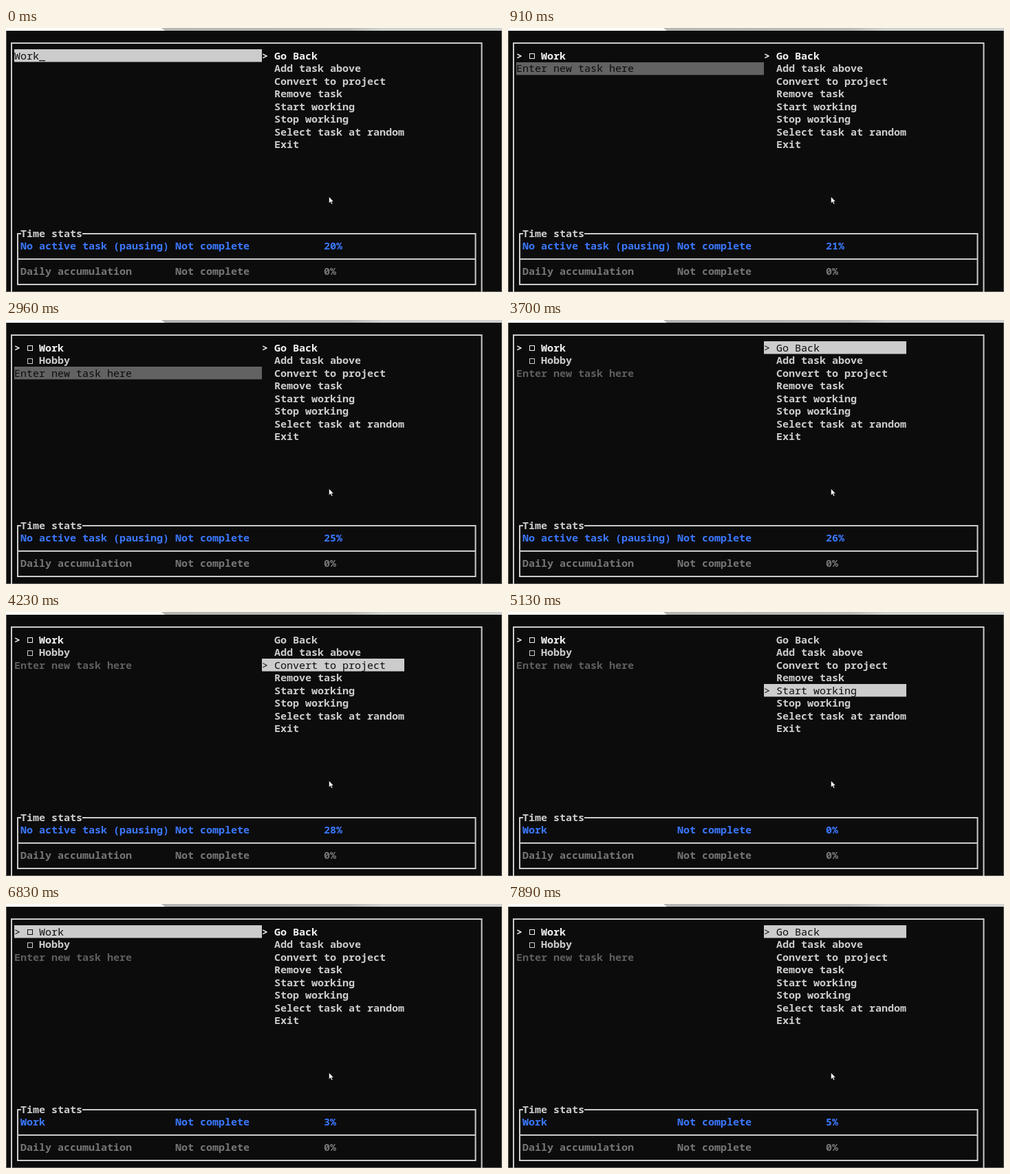
An HTML page for the animation above (8 s loop, 721 px wide and 385 px high).

```html
<!DOCTYPE html>
<html lang="en">
<head>
<meta charset="utf-8">
<title>Terminal task list</title>
<style>
  html, body { margin: 0; width: 100%; height: 100%; overflow: hidden; background: #0c0c0c; }
  svg { display: block; width: 721px; height: 385px; }
  text {
    font: 600 15px "Noto Sans Mono", "DejaVu Sans Mono", monospace;
    fill: #ccc;
    white-space: pre;
  }
  .bright { fill: #f2f2f2; font-weight: 700; }
  .dark { fill: #0c0c0c; font-weight: 400; }
  .dim { fill: #767676; }
  .hint { fill: #5e5e5e; }
  .blue { fill: #3b78ff; }
  .lines { fill: none; stroke: #ccc; stroke-width: 2; }
</style>
</head>
<body>
<svg viewBox="0 0 721 385">
  <defs>
    <linearGradient id="tabs">
      <stop offset="0" stop-color="#b4b4b4"/>
      <stop offset=".55" stop-color="#b8b8b8"/>
      <stop offset=".65" stop-color="#cfd2d0"/>
      <stop offset="1" stop-color="#cfd2d0"/>
    </linearGradient>
  </defs>
  <rect width="721" height="385" fill="#0c0c0c"/>
  <rect x="226" width="495" height="4" fill="url(#tabs)"/>
  <path d="M0 0H226L231 4H0Z" fill="#fff"/>
  <path d="M.5 4V384.5H720.5V4" fill="none" stroke="#5c5c5c"/>
  <path class="lines" d="M8 385V22H691.5V385M22 300H17V374H682.5V300H111M17 337H682.5"/>
  <g id="screen"></g>
  <path d="M469.5 246V255.6L471.7 253.6L473.3 257L474.9 256.2L473.3 253H476.2Z"
        fill="#fff" stroke="#000" stroke-width=".5"/>
</svg>
<script>
const LOOP = 8000, CELL = 9, ROW = 18.5, LEFT = 12, TOP = 31;
const MENU = ["Go Back", "Add task above", "Convert to project", "Remove task",
  "Start working", "Stop working", "Select task at random", "Exit"];
const IDLE = "No active task (pausing)";

// focus: "input", "task" or "menu"
const STEPS = [
  [0, { tasks: [], input: "Work", focus: "input", pick: 0, job: IDLE, pct: 20 }],
  [370, { pct: 21 }],
  [910, { tasks: ["Work"], input: "" }],
  [1570, { pct: 23 }],
  [1940, { input: "H" }],
  [2070, { input: "Ho" }],
  [2320, { input: "Hob" }],
  [2440, { input: "Hobb", pct: 25 }],
  [2560, { input: "Hobby" }],
  [2960, { tasks: ["Work", "Hobby"], input: "" }],
  [3330, { focus: "task", pct: 26 }],
  [3700, { focus: "menu" }],
  [3950, { pick: 1 }],
  [4230, { pick: 2, pct: 28 }],
  [4350, { pick: 3 }],
  [4500, { pick: 4 }],
  [5130, { job: "Work", pct: 0 }],
  [5280, { pct: 1 }],
  [5780, { pick: 3 }],
  [6030, { pick: 2 }],
  [6150, { pick: 1, pct: 3 }],
  [6300, { pick: 0 }],
  [6830, { focus: "task" }],
  [7390, { pct: 5 }],
  [7890, { focus: "menu" }],
];

const screen = document.getElementById("screen");

function add(tag, attrs, text = "") {
  const el = document.createElementNS("http://www.w3.org/2000/svg", tag);
  for (const key in attrs) el.setAttribute(key, attrs[key]);
  el.textContent = text;
  screen.append(el);
}

const colX = col => LEFT + col * CELL;

function write(col, row, text, cls = "") {
  add("text", { x: colX(col), y: TOP + 14.5 + row * ROW, class: cls }, text);
}

function bar(col, row, cols, fill = "#ccc") {
  add("rect", { x: colX(col), y: Math.round(TOP + row * ROW), width: cols * CELL, height: 18.5, fill });
}

function checkbox(row, stroke) {
  add("rect", { x: colX(2) + 1.5, y: Math.round(TOP + row * ROW) + 6.5,
    width: 7, height: 7, fill: "none", stroke });
}

function drawTasks({ tasks, input, focus }) {
  tasks.forEach((name, row) => {
    const active = row === 0, lit = active && focus === "task";
    const cls = lit ? "dark" : active ? "bright" : "";
    if (lit) bar(0, row, 40);
    if (active) write(0, row, ">", cls);
    checkbox(row, lit ? "#0c0c0c" : active ? "#f2f2f2" : "#ccc");
    write(4, row, name, cls);
  });
  const row = tasks.length, editing = focus === "input";
  if (editing) bar(0, row, 40, input ? "#ccc" : "#626262");
  write(0, row, input ? input + "_" : "Enter new task here", editing ? "dark" : "hint");
}

function drawMenu({ pick, focus }) {
  MENU.forEach((label, row) => {
    const active = row === pick, lit = active && focus === "menu";
    const cls = lit ? "dark" : active ? "bright" : "";
    if (lit) bar(40, row, 23);
    if (active) write(40, row, ">", cls);
    write(42, row, label, cls);
  });
}

function drawStat(row, name, pct, cls) {
  write(1, row, name, cls);
  write(26, row, "Not complete", cls);
  write(50, row, pct + "%", cls);
}

function draw(state) {
  screen.replaceChildren();
  drawTasks(state);
  drawMenu(state);
  write(1, 14, "Time stats");
  drawStat(15, state.job, state.pct, "blue");
  drawStat(17, "Daily accumulation", 0, "dim");
}

const start = performance.now();
let shown = 0;

function tick(now) {
  const t = Math.max(0, now - start) % LOOP;
  const past = STEPS.filter(([at]) => at <= t);
  if (past.length !== shown) {
    shown = past.length;
    draw(Object.assign({}, ...past.map(([, change]) => change)));
  }
  requestAnimationFrame(tick);
}
tick(start);
</script>
</body>
</html>
```
